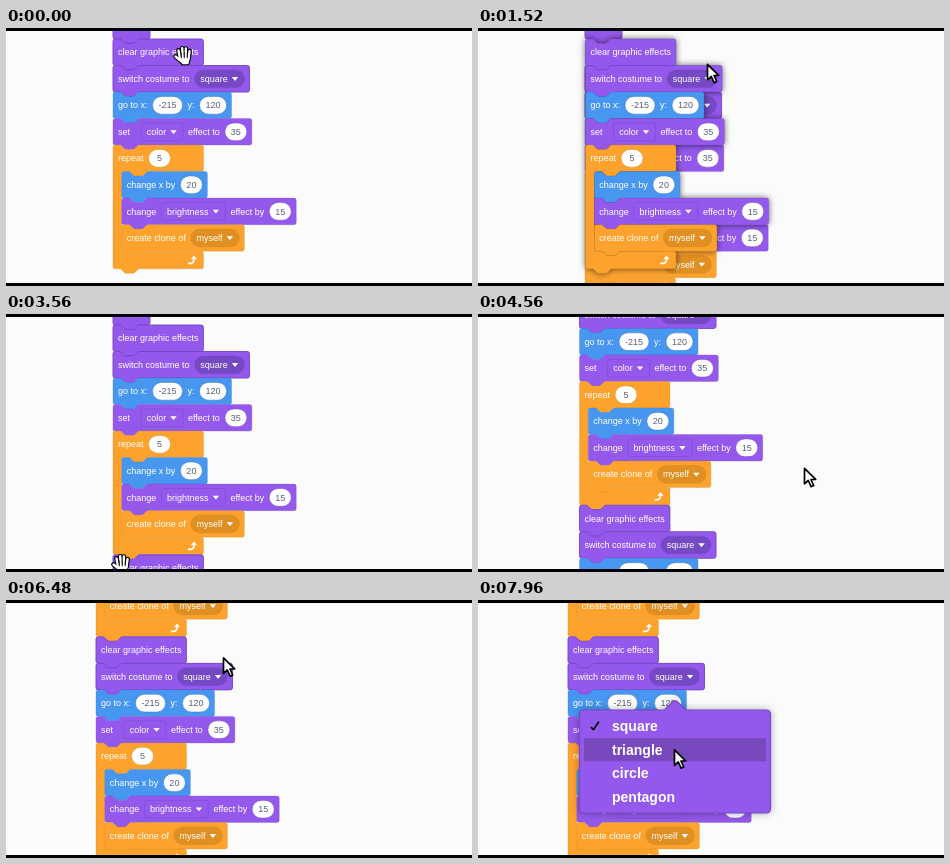
An HTML page with a canvas for the animation above (8000 ms loop, 466x258 px).

```html
<!DOCTYPE html>
<html lang="en">
<head>
<meta charset="utf-8">
<title>Duplicating a block script</title>
<style>
html, body { margin: 0; width: 100%; height: 100%; overflow: hidden; background: #fbfbfb; }
canvas { display: block; }
</style>
</head>
<body>
<canvas id="stage" width="466" height="258"></canvas>
<script>
const W = 466, H = 258, LOOP = 8000, STEP = 40;
const U = 0.5525;            // pixels per block unit
const ROW = 48 * U, INDENT = 16 * U, STACK = 416 * U, GAP = 5;
const HOME = { x: 107, y: 11 };
const SANS = '"Liberation Sans", Arial, sans-serif';

const stage = document.getElementById('stage').getContext('2d');
const layer = document.createElement('canvas');
layer.width = W;
layer.height = H;
const layerCtx = layer.getContext('2d');

const LOOKS = { fill: '#9459ec', dark: '#7549c4', line: '#7448c6' };
const MOTION = { fill: '#4797f0', dark: '#4280d7', line: '#3474c8' };
const CONTROL = { fill: '#fca22d', dark: '#e08f22', line: '#d08a22' };

// <5> is a number, (a) a round dropdown, [a] a square dropdown.
const SCRIPT = [
  block(LOOKS, 'clear graphic effects'),
  block(LOOKS, 'switch costume to (square)'),
  block(MOTION, 'go to x: <-215> y: <120>'),
  block(LOOKS, 'set [color] effect to <35>'),
  block(CONTROL, 'repeat <5>', { loop: true }),
  block(MOTION, 'change x by <20>', { inner: true }),
  block(LOOKS, 'change [brightness] effect by <15>', { inner: true }),
  block(CONTROL, 'create clone of (myself)', { inner: true })
];

// Lays a block's words and fields out from left to right.
function block(tone, spec, flags = {}) {
  stage.font = `9px ${SANS}`;
  const kinds = { '<': 'num', '(': 'oval', '[': 'box' };
  const parts = [];
  let x = GAP;
  for (const token of spec.match(/[<(\[][^>)\]]+[>)\]]|[^<(\[]+/g)) {
    const kind = kinds[token[0]] || 'text';
    const s = kind === 'text' ? token.trim() : token.slice(1, -1);
    if (!s) continue;
    const tw = stage.measureText(s).width;
    const w = { text: tw, num: Math.max(22, tw + 12), oval: tw + 22.5, box: tw + 22.5 }[kind];
    if (kind !== 'text') x = Math.max(x, 28);
    parts.push({ kind, s, x, w });
    x += w + GAP;
  }
  return { tone, parts, w: Math.max(x, flags.loop ? 90.5 : 0), ...flags };
}

const NOTCH = 'c2 0 3 1 4 2l4 4c1 1 2 2 4 2h12c2 0 3-1 4-2l4-4c1-1 2-2 4-2';
const TAB = 'c-2 0-3 1-4 2l-4 4c-1 1-2 2-4 2h-12c-2 0-3-1-4-2l-4-4c-1-1-2-2-4-2';

function outline(width, loop) {
  const w = width / U;
  const top = `M0 4a4 4 0 0 1 4-4H12${NOTCH}H${w - 4}a4 4 0 0 1 4 4V44a4 4 0 0 1-4 4`;
  const arm = `H64${TAB}H20a4 4 0 0 0-4 4V188a4 4 0 0 0 4 4H28${NOTCH}H${w - 4}a4 4 0 0 1 4 4V220a4 4 0 0 1-4 4`;
  return new Path2D(`${top}${loop ? arm : ''}H48${TAB}H4a4 4 0 0 1-4-4z`);
}

function shape(c, x, y, width, fill, line, loop) {
  const path = outline(width, loop);
  c.save();
  c.translate(x, y);
  c.scale(U, U);
  c.fillStyle = fill;
  c.fill(path);
  if (line) {
    c.strokeStyle = line;
    c.stroke(path);
  }
  c.restore();
}

function poly(c, points) {
  c.beginPath();
  points.forEach(([x, y]) => c.lineTo(x, y));
  c.closePath();
}

function segment(c, x0, y0, x1, y1) {
  c.beginPath();
  c.moveTo(x0, y0);
  c.lineTo(x1, y1);
  c.stroke();
}

function label(c, s, x, y, color = '#fff', align = 'left') {
  c.font = `9px ${SANS}`;
  c.fillStyle = color;
  c.textAlign = align;
  c.fillText(s, x, y + 16.4);
}

function field(c, p, x, y, tone) {
  const h = 32 * U;
  c.beginPath();
  c.roundRect(x, y + (ROW - h) / 2, p.w, h, p.kind === 'box' ? 2 : h / 2);
  c.fillStyle = { num: '#fff', oval: tone.dark, box: tone.fill }[p.kind];
  c.fill();
  c.strokeStyle = tone.line;
  c.lineWidth = 0.5;
  c.stroke();
  if (p.kind === 'num') return label(c, p.s, x + p.w / 2, y, '#575e75', 'center');
  label(c, p.s, x + 5.7, y);
  const cx = x + p.w - 9.5, cy = y + 11.6;
  poly(c, [[cx - 3.2, cy], [cx + 3.2, cy], [cx, cy + 3.8]]);
  c.fill();
}

function loopArrow(c, x, y) {
  c.strokeStyle = c.fillStyle = '#fff';
  c.lineWidth = 1.7;
  c.beginPath();
  c.moveTo(x - 4, y + 3.2);
  c.quadraticCurveTo(x + 2, y + 4, x + 2, y - 1);
  c.stroke();
  poly(c, [[x - 1.2, y - 0.8], [x + 2, y - 4.6], [x + 5, y - 0.8]]);
  c.fill();
}

function drawScript(c, x, y) {
  SCRIPT.forEach((b, i) => {
    const bx = x + (b.inner ? INDENT : 0), by = y + i * ROW;
    shape(c, bx, by, b.w, b.tone.fill, b.tone.line, b.loop);
    b.parts.forEach(p => p.kind === 'text'
      ? label(c, p.s, bx + p.x, by)
      : field(c, p, bx + p.x, by, b.tone));
  });
  loopArrow(c, x + 79, y + 8 * ROW + 9);
}

function drawLifted(x, y) {
  layerCtx.clearRect(0, 0, W, H);
  drawScript(layerCtx, x, y);
  stage.save();
  stage.shadowColor = 'rgba(0,0,0,.6)';
  stage.shadowBlur = 6;
  stage.drawImage(layer, 0, 0);
  stage.restore();
}

// Each move is eased: from one time to another, ending at a point.
const move = (from, until, x, y) => ({ from, until, x, y });
const DUPLICATE = 1520, DROP = 3560, OPEN = 7040;

const DRAG = [
  move(1560, 1600, 231, 34),
  move(1600, 2160, 304, 143),
  move(2360, 3320, 112, 246)
];
const POINTER = [
  move(240, 840, 229, 35.5),
  move(DROP - STEP, DROP, 115, 250),
  move(3600, 3840, 326, 153.5),
  move(5880, 6080, 217, 57),
  move(6480, 6880, 201, 77),
  move(7200, 7960, 196, 149)
];
const SCROLL = [
  move(4000, 4080, -5, -45),
  move(4520, 4840, -17, -152),
  move(5240, 5440, -17, -204)
];

function follow(moves, x, y, t) {
  for (const m of moves) {
    const k = Math.min(1, Math.max(0, (t - m.from) / (m.until - m.from)));
    const e = k * k * (3 - 2 * k);
    x += (m.x - x) * e;
    y += (m.y - y) * e;
  }
  return { x, y };
}

function drawArrow(c, x, y) {
  c.save();
  c.translate(x + 0.5, y + 0.8);
  poly(c, [[0, 0], [0, 15.5], [3.8, 12.2], [6.6, 18.4], [9.2, 17.2], [6.5, 11.2], [11.2, 11]]);
  c.lineJoin = 'round';
  c.strokeStyle = '#000';
  c.lineWidth = 1.7;
  c.fillStyle = '#fff';
  c.fill();
  c.stroke();
  c.restore();
}

function drawHand(c, x, y) {
  c.save();
  c.translate(x, y);
  c.lineCap = c.lineJoin = 'round';
  for (const [color, width] of [['#000', 4.6], ['#fff', 2.4]]) {
    c.strokeStyle = c.fillStyle = color;
    c.lineWidth = width;
    for (let i = 0; i < 4; i++) {
      segment(c, -3 + 2.8 * i, 3, -4.5 + 3.7 * i, -8 + 1.2 * (i - 1.4) ** 2);
    }
    segment(c, -2, 5, -7.5, 0.5);
    poly(c, [[-3, 3], [5.5, 2], [4.5, 7], [0, 7]]);
    c.fill();
    c.stroke();
  }
  c.strokeStyle = '#000';
  c.lineWidth = 0.8;
  for (let i = 0; i < 3; i++) segment(c, -1.7 + 3 * i, -3, -1.7 + 3 * i, 2);
  c.restore();
}

function drawMenu(c, alpha, pointerY) {
  c.save();
  c.globalAlpha = alpha;
  c.beginPath();
  c.roundRect(101.5, 110, 191, 103, 4);
  c.moveTo(186, 110.5);
  c.lineTo(195, 101.5);
  c.quadraticCurveTo(197, 100, 199, 101.5);
  c.lineTo(208, 110.5);
  c.fillStyle = LOOKS.fill;
  c.strokeStyle = LOOKS.line;
  c.lineWidth = 1.2;
  c.shadowColor = 'rgba(0,0,0,.35)';
  c.shadowBlur = 8;
  c.fill();
  c.shadowBlur = 0;
  c.stroke();
  c.fillRect(187, 109, 20, 3);

  const pitch = 23.7, top = 114.4;
  c.font = `bold 14px ${SANS}`;
  c.textAlign = 'left';
  ['square', 'triangle', 'circle', 'pentagon'].forEach((s, i) => {
    const y = top + i * pitch;
    if (pointerY >= y && pointerY < y + pitch) {
      c.fillStyle = '#7848bd';
      c.fillRect(106, y, 182, pitch - 0.5);
    }
    c.fillStyle = '#fff';
    c.fillText(s, 134, y + 16.6);
  });
  c.strokeStyle = '#111';
  c.lineWidth = 1.8;
  segment(c, 113, 127, 115.5, 130);
  segment(c, 115.2, 130, 121, 121.5);
  c.restore();
}

function draw(t) {
  const c = stage;
  c.fillStyle = '#fbfbfb';
  c.fillRect(0, 0, W, H);

  const s = follow(SCROLL, 0, 0, t);
  const x = HOME.x + s.x, y = HOME.y + s.y;
  const lifted = t >= DUPLICATE && t < DROP;
  const drag = follow(DRAG, HOME.x + 0.5, HOME.y, t);
  const gapTop = lifted && t < 1680;
  const gapEnd = lifted && t >= 2960;

  shape(c, x, y - ROW, 37, LOOKS.fill, LOOKS.line);
  if (gapTop) shape(c, x, y, 90, '#c7c7c7');
  if (gapEnd) shape(c, x, y + STACK, 90, '#c7c7c7');
  drawScript(c, x, y + (gapTop ? ROW : 0));
  if (t >= DROP) drawScript(c, x, y + STACK);
  if (lifted) drawLifted(drag.x, drag.y);

  const p = lifted && t >= 1600
    ? { x: drag.x - 2, y: drag.y + 1.5 }
    : follow(POINTER, 177, 28, t);
  if (t >= OPEN) drawMenu(c, Math.min(1, (t - OPEN + STEP) / 160), p.y);
  const hover = !lifted && t < 3840 && p.x < 198;
  (hover ? drawHand : drawArrow)(c, p.x, p.y);

  c.fillStyle = '#000';
  c.fillRect(0, 0, W, 3);
  c.fillRect(0, 255, W, 3);
}

const start = performance.now();
function tick() {
  const t = (performance.now() - start) % LOOP;
  draw(Math.floor(t / STEP) * STEP);
  requestAnimationFrame(tick);
}
tick();
</script>
</body>
</html>
```
